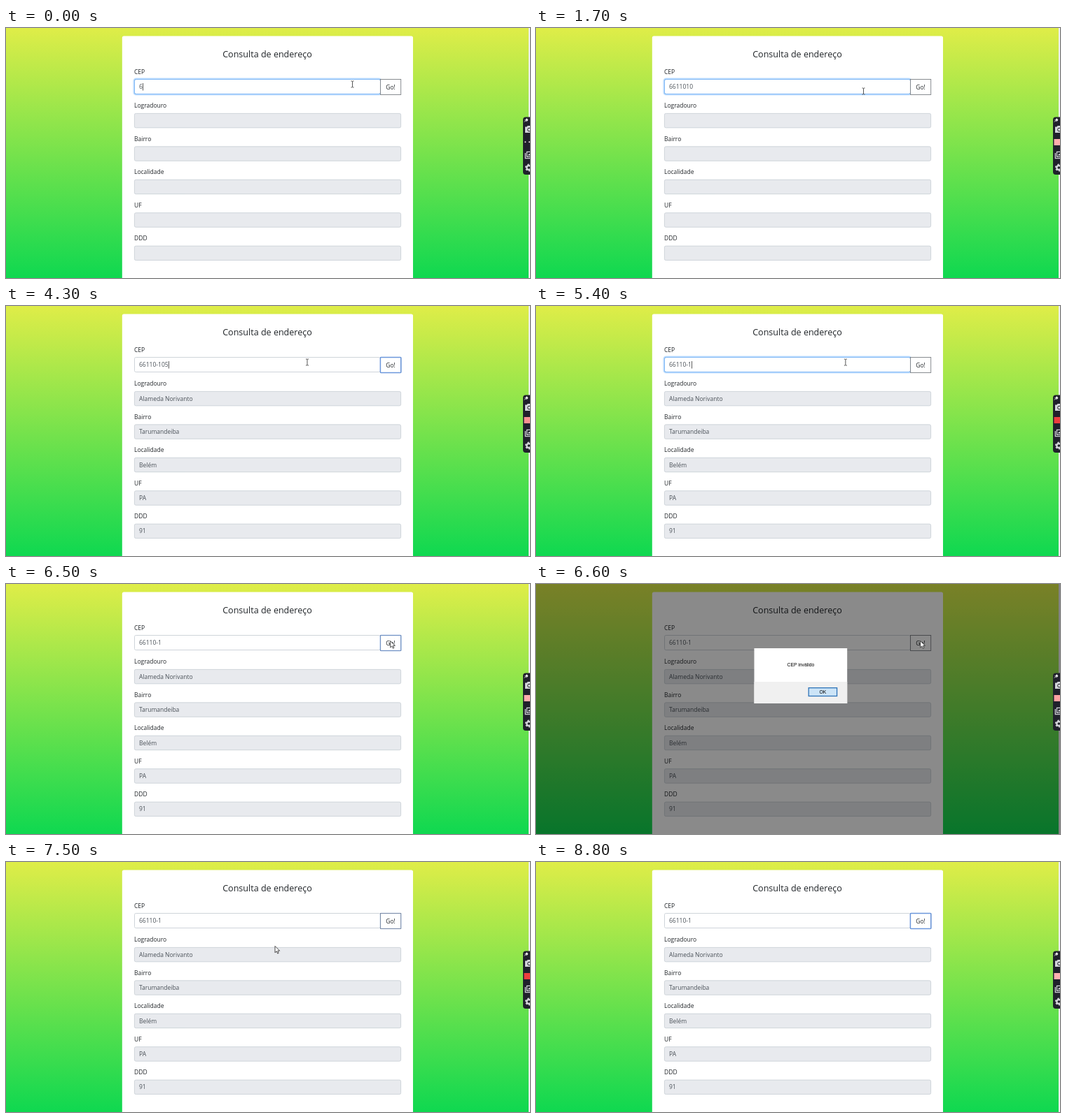
An HTML page that plays this animation: 748x358 px, repeating every 8.9 s.

```html
<!DOCTYPE html>
<html lang="pt-BR">
<head>
<meta charset="utf-8">
<title>Consulta de endereço</title>
<style>
  html, body { margin: 0; width: 100%; height: 100%; overflow: hidden; }
  svg { display: block; width: 748px; height: 358px; }
  text { font: 8.5px "Open Sans", "Noto Sans", sans-serif; fill: #212529; white-space: pre; }
  .title { font-size: 12.56px; }
  .value { fill: #495057; }
  .field { fill: #e8eaee; stroke: #ced4da; }
  .dialog text { font: 6.8px "Liberation Sans", Arial, sans-serif; fill: #000; }
</style>
</head>
<body>
<svg viewBox="0 0 748 358">
  <defs>
    <linearGradient id="sky" x1="0" y1="0" x2="0" y2="1">
      <stop offset="0" stop-color="#dfed48"/>
      <stop offset="1" stop-color="#0fd850"/>
    </linearGradient>
  </defs>
  <rect width="748" height="358" fill="url(#sky)"/>
  <rect x="746" width="2" height="358" fill="#eef0ee"/>
  <rect x="165.8" y="11.6" width="415.2" height="360" rx="2.5" fill="#fff"/>
  <text class="title" x="373" y="42" text-anchor="middle">Consulta de endereço</text>
  <text x="183" y="65.7">CEP</text>

  <rect x="183.5" y="73.5" width="351" height="21" rx="2" fill="#fff" stroke="#ced4da"/>
  <g id="inputRing" fill="none">
    <rect x="182.7" y="72.7" width="352.6" height="22.6" rx="3" stroke="#007bff" stroke-opacity=".25" stroke-width="2.6"/>
    <rect x="183.5" y="73.5" width="351" height="21" rx="2" stroke="#80b8f5"/>
  </g>
  <text id="cep" class="value" x="190" y="87.2"></text>
  <rect id="caret" y="79" width=".8" height="10.5" fill="#333"/>

  <rect x="534.5" y="73.5" width="29.2" height="22" fill="#fff" stroke="#7b7f84" stroke-width=".9"/>
  <rect id="buttonRing" x="534.4" y="73.4" width="29.4" height="22.2" rx="1" fill="none" stroke="#6b97dc" stroke-width="1.5"/>
  <text x="549" y="87.9" text-anchor="middle">Go!</text>

  <g id="fields"></g>

  <g id="modal" class="dialog">
    <rect width="748" height="358" opacity=".46"/>
    <rect x="311.5" y="92" width="132.7" height="79" fill="#fff"/>
    <rect x="311.5" y="140" width="132.7" height="31" fill="#f0f0f0"/>
    <text x="358.5" y="118">CEP inválido</text>
    <rect x="389.2" y="148.7" width="40.4" height="11.8" fill="#cce4f7" stroke="#2f74b8" stroke-width="1.3"/>
    <text x="409.3" y="157" text-anchor="middle">OK</text>
  </g>

  <path id="beam" d="M-2-4.5H-.5L0-4L.5-4.5H2M0-4V4M-2 4.5H-.5L0 4L.5 4.5H2" fill="none" stroke="#444" stroke-width=".9"/>
  <path id="arrow" d="M0 0V9.4L2.2 7.4L3.7 10.7L5.2 10L3.8 6.8H6.7Z" fill="#fff" stroke="#222" stroke-width=".8"/>

  <g>
    <rect x="738" y="127.5" width="16" height="82.5" rx="4" fill="#20212c"/>
    <path d="M740 134.5L742 132.5M740.5 131L743.7 134.2M742 131L743.2 129.8L745 131.6L743.8 133Z" fill="#fff" stroke="#fff" stroke-width=".9"/>
    <path d="M741 141.5H743.4L744.6 140H750V150H741Z" fill="#d4d5da"/>
    <circle cx="747" cy="145.6" r="2.4" fill="#d4d5da" stroke="#20212c"/>
    <g id="dots" fill="#f3e3e3">
      <circle cx="741.3" cy="163.3" r="1"/>
      <circle cx="747" cy="163.3" r="1"/>
    </g>
    <rect id="rec" x="739.5" y="159" width="10" height="9"/>
    <path d="M741.3 179V186.7H750M743.5 177.3H751V184.4H743.5Z" fill="none" stroke="#d4d5da" stroke-width="1.3"/>
    <path d="M745 182.5L747 179.5L749 182.5Z" fill="#d4d5da"/>
    <circle cx="746.3" cy="200" r="4.6" fill="none" stroke="#d4d5da" stroke-width="1.7" stroke-dasharray="2.4"/>
    <circle cx="746.3" cy="200" r="3" fill="none" stroke="#d4d5da" stroke-width="2.4"/>
  </g>
</svg>
<script>
const LOOP = 8900, STEP = 100;
const RESULT = 2700, OPEN = 6600, CLOSE = 7450;
const $ = id => document.getElementById(id);

const values = [];
[['Logradouro', 'Alameda Norivanto'], ['Bairro', 'Tarumandeiba'],
 ['Localidade', 'Belém'], ['UF', 'PA'], ['DDD', '91']].forEach(([label, value], i) => {
  const g = document.createElementNS('http://www.w3.org/2000/svg', 'g');
  g.setAttribute('transform', `translate(0 ${47.45 * i})`);
  g.innerHTML = `<text x="183" y="114.4">${label}</text>
    <rect class="field" x="183.4" y="122.4" width="380.2" height="20.4" rx="2"/>
    <text class="value" x="190" y="135.7">${value}</text>`;
  $('fields').append(g);
  values.push(g.lastElementChild);
});

// [time, text in the CEP box]
const typed = [[0, '6'], [200, '66'], [400, '661'], [600, '6611'], [800, '66110'],
  [1000, '661101'], [1150, '6611010'], [1800, '66110105'],
  [RESULT, '66110-105'], [4900, '66110-10'], [5200, '66110-1']];

// [time, x, y] of the mouse
const path = [[0, 494.5, 80.5], [1700, 467.5, 90.5], [2300, 549, 83], [2500, 549, 83],
  [4200, 430, 80.5], [5300, 430, 80.5], [6300, 548.7, 81.5], [OPEN, 548.7, 81.5],
  [7300, 408.5, 154], [7400, 408.5, 154], [7900, 286, -14]];

// [start, end] of keyboard focus
const inputFocus = [[-999, 2400], [4300, 6350]];
const buttonFocus = [[2400, 4300], [6400, OPEN], [CLOSE, LOOP + 999]];

const clamp = v => Math.max(0, Math.min(1, v));
const ring = (spans, t) => Math.max(...spans.map(([a, b]) =>
  Math.min(clamp((t - a) / 150), clamp(1 - (t - b) / 150))));
const show = (el, on) => el.setAttribute('visibility', on ? 'visible' : 'hidden');
const latest = (list, t) => list.filter(k => k[0] <= t).pop();

function mouse(t) {
  const i = path.findIndex(k => k[0] > t);
  if (i < 0) return path[path.length - 1].slice(1);
  const [t0, x0, y0] = path[i - 1], [t1, x1, y1] = path[i];
  const u = (t - t0) / (t1 - t0);
  return [x0 + (x1 - x0) * u, y0 + (y1 - y0) * u];
}

function draw(t) {
  const [keyTime, text] = latest(typed, t);
  $('cep').textContent = text;
  values.forEach(v => show(v, t >= RESULT));

  const focus = inputFocus.find(([a, b]) => t >= a && t < b);
  const since = focus ? t - Math.max(focus[0], keyTime) : 0;
  $('caret').setAttribute('x', 190.3 + $('cep').getComputedTextLength());
  show($('caret'), focus && since % 1060 < 530);
  $('inputRing').setAttribute('opacity', ring(inputFocus, t));

  const modal = t >= OPEN && t < CLOSE;
  $('buttonRing').setAttribute('opacity', modal ? 0 : ring(buttonFocus, t));
  show($('modal'), modal);

  const [x, y] = mouse(t);
  const overInput = !modal && x > 183 && x < 534 && y > 73 && y < 95;
  for (const id of ['beam', 'arrow']) {
    $(id).setAttribute('transform', `translate(${x} ${y})`);
    show($(id), (id === 'beam') === overInput);
  }

  // recording light pulses between red and pink
  const glow = (.5 + .5 * Math.cos((t - 1600) / 2400 * 2 * Math.PI)) ** 2;
  const c = 62 + 116 * glow;
  $('rec').setAttribute('fill', `rgb(${238 + 17 * glow},${c},${c})`);
  show($('rec'), t >= 100);
  show($('dots'), t < 100);
}

const start = performance.now();
function tick() {
  const t = (performance.now() - start) % LOOP;
  draw(Math.floor(Math.max(0, t) / STEP) * STEP);
  requestAnimationFrame(tick);
}
tick();
</script>
</body>
</html>
```
